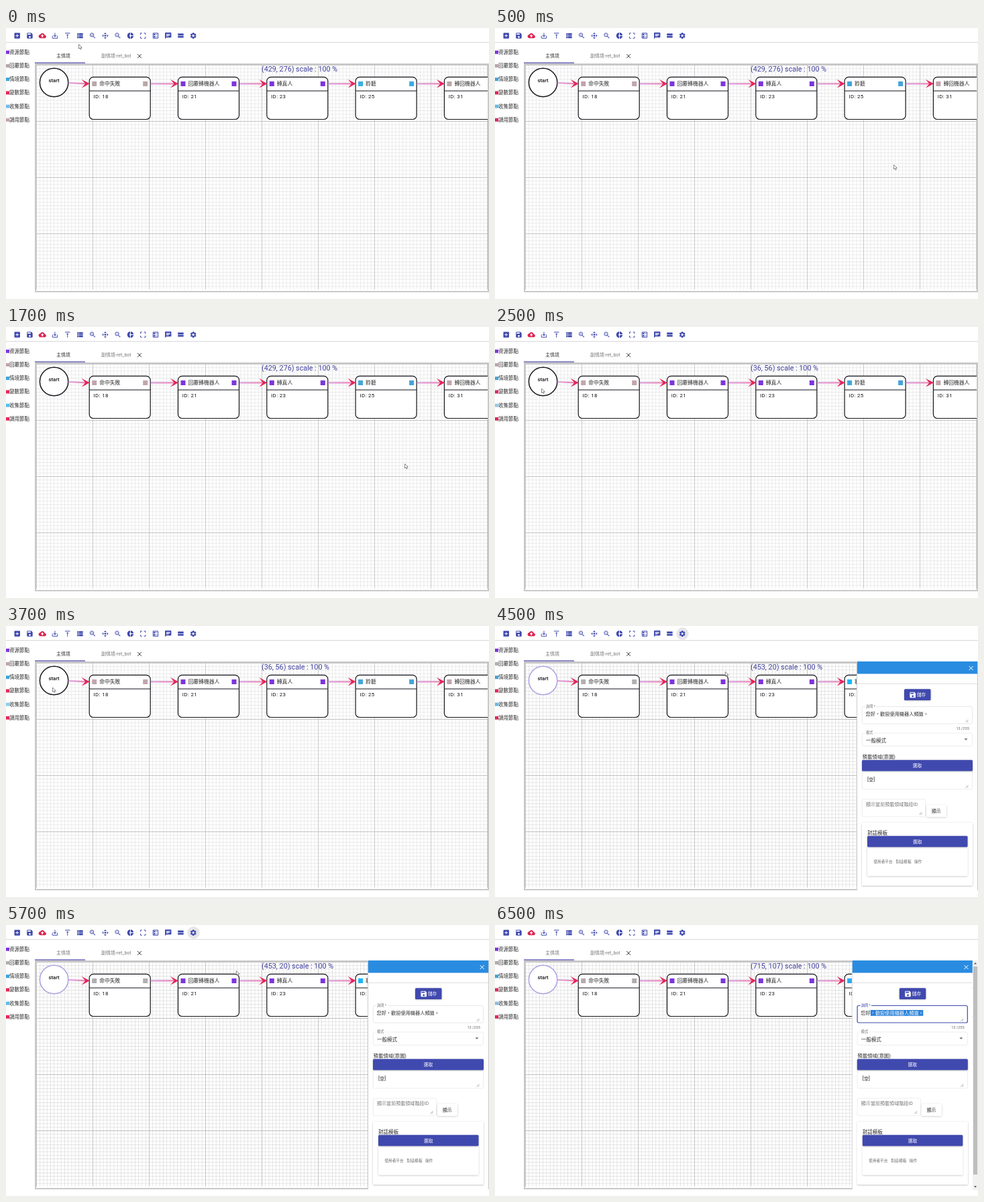
An HTML page for the animation above (8 s loop, 720 px wide and 405 px high).

```html
<!DOCTYPE html>
<html lang="zh-Hant">
<head>
<meta charset="utf-8">
<style>
html, body { margin: 0; width: 100%; height: 100%; overflow: hidden; background: #fff; }
svg { display: block; width: 720px; height: 405px; font-family: Roboto, "Noto Sans CJK TC", "Noto Sans CJK JP", "Noto Sans CJK", sans-serif; }
text { white-space: pre; }
</style>
</head>
<body>
<svg id="stage" viewBox="0 0 720 405"></svg>
<script>
const INDIGO = '#3f4aae', PURPLE = '#7c34dc', RED = '#e4265a';

const scenes = [
  { end: 500, coords: '429, 276', cursor: [108.5, 24.5], gray: '#b9a8a9', blue: '#38aee4', legend: ['#b3a9aa', '#79b9e6', '#c6a3a6'] },
  { end: 2500, coords: '429, 276', cursor: [594.5, 204.5], gray: '#c2a5ac', blue: '#43a5d9', legend: ['#c2a5ac', '#55c1ea', RED] },
  { end: 4500, coords: '36, 56', cursor: [69.5, 92], gray: '#c2a5ac', blue: '#43a5d9', legend: ['#c2a5ac', '#8fcdec', RED] },
  { end: 6500, coords: '453, 20', cursor: [343.3, 68.5], gray: '#b1afb0', blue: '#1cb5f6', legend: ['#b1afb0', '#62bce8', RED], panel: 547 },
  { end: 8000, coords: '715, 107', gray: '#b4abac', blue: '#2ba8ee', legend: ['#b4abac', '#84bfe8', RED], panel: 539.8, editing: true }
];

const box = 'M19 3H5c-1.1 0-2 .9-2 2v14c0 1.1.9 2 2 2h14c1.1 0 2-.9 2-2V5c0-1.1-.9-2-2-2z';
const lens = 'M15.5 14h-.79l-.28-.27C15.41 12.59 16 11.11 16 9.5 16 5.91 13.09 3 9.5 3S3 5.91 3 9.5 5.91 16 9.5 16c1.61 0 3.09-.59 4.23-1.57l.27.28v.79l5 4.99L20.49 19zm-6 0C7 14 5 12 5 9.5S7 5 9.5 5 14 7 14 9.5 12 14 9.5 14z';
const floppy = 'M17 3H5c-1.1 0-2 .9-2 2v14c0 1.1.9 2 2 2h14c1.1 0 2-.9 2-2V7zm-5 16a3 3 0 1 1 0-6 3 3 0 0 1 0 6zm3-10H5V5h10z';
const icons = [
  box + 'm-2 10h-4v4h-2v-4H7v-2h4V7h2v4h4z',
  floppy,
  'M19.35 10.04C18.67 6.59 15.64 4 12 4 9.11 4 6.6 5.64 5.35 8.04 2.34 8.36 0 10.91 0 14c0 3.31 2.69 6 6 6h13c2.76 0 5-2.24 5-5 0-2.64-2.05-4.78-4.65-4.96zM14 13v4h-4v-4H7l5-5 5 5z',
  'M19 12v7H5v-7H3v7c0 1.1.9 2 2 2h14c1.1 0 2-.9 2-2v-7zm-6 .67l2.59-2.58L17 11.5l-5 5-5-5 1.41-1.41L11 12.67V3h2z',
  'M8 11h3v10h2V11h3l-4-4zM4 3v2h16V3z',
  'M3 4h4v4.6H3zM8 4h13v4.6H8zM3 9.7h4v4.6H3zM8 9.7h13v4.6H8zM3 15.4h4V20H3zM8 15.4h13V20H8z',
  lens + 'M7 9h2V7h1v2h2v1h-2v2H9v-2H7z',
  'M12 2l4 4.5H8zM12 22l4-4.5H8zM2 12l4.5-4v8zM22 12l-4.5-4v8zM12 9a3 3 0 1 0 .01 0z',
  lens + 'M7 9h5v1H7z',
  'M11 9.16V2c-5 .5-9 4.79-9 10s4 9.5 9 10v-7.16c-1-.41-2-1.52-2-2.84s1-2.43 2-2.84zM14.86 11H22c-.48-4.75-4-8.53-9-9v7.16c1 .3 1.52.98 1.86 1.84zM13 14.84V22c5-.47 8.52-4.25 9-9h-7.14c-.34.86-.86 1.54-1.86 1.84z',
  'M3 5v4h2V5h4V3H5c-1.1 0-2 .9-2 2zm2 10H3v4c0 1.1.9 2 2 2h4v-2H5zm14 4h-4v2h4c1.1 0 2-.9 2-2v-4h-2zm0-16h-4v2h4v4h2V5c0-1.1-.9-2-2-2z',
  box + 'M19 19H5V5h14zM13 7.5h5v2h-5zM13 14.5h5v2h-5zM11 6H6v5h5zM11 13H6v5h5z',
  'M20 2H4c-1.1 0-2 .9-2 2v18l4-4h14c1.1 0 2-.9 2-2V4c0-1.1-.9-2-2-2zM6 9h12v2H6zM14 14H6v-2h8zM18 8H6V6h12z',
  'M3 18.5h18v-6H3zM3 5v6h18V5z',
  'M19.14 12.94a7 7 0 0 0 0-1.88l2.03-1.58c.18-.14.23-.41.12-.61l-1.92-3.32c-.12-.22-.37-.29-.59-.22l-2.39.96a7 7 0 0 0-1.62-.94l-.36-2.54A.48.48 0 0 0 13.93 2.4h-3.84c-.24 0-.43.17-.47.41l-.36 2.54a7 7 0 0 0-1.62.94l-2.39-.96c-.22-.08-.47 0-.59.22L2.74 8.87c-.12.21-.08.47.12.61l2.03 1.58a7 7 0 0 0 0 1.88l-2.03 1.58c-.18.14-.23.41-.12.61l1.92 3.32c.12.22.37.29.59.22l2.39-.96c.5.38 1.03.7 1.62.94l.36 2.54c.05.24.24.41.48.41h3.84c.24 0 .44-.17.47-.41l.36-2.54a7 7 0 0 0 1.62-.94l2.39.96c.22.08.47 0 .59-.22l1.92-3.32c.12-.22.07-.47-.12-.61zM12 15.6a3.6 3.6 0 1 1 0-7.2 3.6 3.6 0 0 1 0 7.2z'
];

const rect = (x, y, w, h, fill, more = '') => `<rect x="${x}" y="${y}" width="${w}" height="${h}" fill="${fill}" ${more}/>`;
const path = (d, stroke, width = 1, more = 'fill="none"') => `<path d="${d}" stroke="${stroke}" stroke-width="${width}" ${more}/>`;
const text = (x, y, size, str, fill = '#2c2c2c', more = '') => `<text x="${x}" y="${y}" font-size="${size}" fill="${fill}" ${more}>${str}</text>`;
const mid = 'text-anchor="middle"';
const icon = (x, y, d, fill, k = .47) => `<path transform="translate(${x} ${y}) scale(${k}) translate(-12 -12)" d="${d}" fill="${fill}" fill-rule="evenodd"/>`;
const cross = (x, y, r, color) => path(`M${x - r} ${y - r}l${2 * r} ${2 * r}m0 ${-2 * r}l${-2 * r} ${2 * r}`, color);
const grid = (id, step, color, width) => `<pattern id="${id}" x="45" y="55" width="${step}" height="${step}" patternUnits="userSpaceOnUse">${path(`M${step} 0H0V${step}`, color, width)}</pattern>`;

const defs = `<defs>
  ${grid('minor', 5.25, '#aaa', .9)}
  ${grid('major', 84, '#a0a0a0', 1.4)}
  <linearGradient id="link"><stop stop-color="#dba0e0"/><stop offset="1" stop-color="#ee86b6"/></linearGradient>
  <clipPath id="view"><path d="M45 55H718V393H45z"/></clipPath>
  <filter id="shade" x="-20%" y="-20%" width="140%" height="150%"><feDropShadow dx="0" dy=".7" stdDeviation=".8" flood-opacity=".28"/></filter>
</defs>`;

function toolbar(s) {
  let out = path('M0 21.5H720', '#d9d9de');
  if (s.panel && !s.editing) out += '<circle cx="279.5" cy="11.5" r="9.2" fill="#e6e6ea"/>';
  icons.forEach((d, i) => out += icon(16.7 + i * 18.75, 11.5, d, i == 2 ? '#dc2450' : INDIGO));
  return out;
}

function sidebar(s) {
  const colors = [PURPLE, s.legend[0], '#3ea3d8', RED, s.legend[1], s.legend[2]];
  return ['資源', '回覆', '情境', '變數', '收集', '調用'].map((name, i) => {
    const y = 36 + i * 20.2;
    return rect(0, y - 2.2, 5, 5, colors[i]) + text(5, y + 2.8, 7.5, name + '節點');
  }).join('');
}

function tabs(s) {
  return text(85.5, 44.2, 7, '主情境', s.panel ? '#777' : '#333', mid)
    + text(142, 44.2, 7, '副情境-ret_bot', '#777')
    + cross(199, 42, 3, '#444')
    + rect(43, 51.3, 75, 1.5, '#6c65b8');
}

function node(x, id, name, color) {
  return rect(x, 73.3, 91, 63.2, '#fff', 'rx="6" stroke="#15151c" stroke-width="1.2"')
    + path(`M${x} 94h91`, '#15151c', 1.2)
    + rect(x + 4, 79.8, 7, 7.2, color) + rect(x + 80, 79.8, 7, 7.2, color)
    + text(x + 15, 86.2, 7.8, name)
    + text(x + 6.3, 104.8, 7.8, 'ID: ' + id, '#111', 'letter-spacing=".4"');
}

function link(x1, x2) {
  const y = x1 < 100 ? 82 : 83.3;
  return path(`M${x1} ${y}L${x2 - 5} 83.4`, 'url(#link)', 2.2)
    + `<path d="M${x2 + .5} 83.3l-12-6.5 5.5 6.5-5.5 6.5z" fill="${RED}"/>`;
}

function board(s) {
  const xs = [0, 1, 2, 3, 4].map(i => 124.2 + i * 132.3);
  const nodes = [[18, '命中失敗', s.gray], [21, '回覆轉機器人', PURPLE], [23, '轉真人', PURPLE], [25, '聆聽', s.blue], [31, '轉回機器人', s.gray]];
  return rect(44, 54, 675, 340, '#fff', 'stroke="#c9c9c9" stroke-width="2"')
    + '<g clip-path="url(#view)">'
    + rect(45, 55, 673, 335.8, 'url(#minor)', `opacity="${s.panel ? .65 : .5}"`)
    + rect(45, 55, 673, 335.8, 'url(#major)', 'opacity=".65"')
    + `<circle cx="71.6" cy="81.5" r="21.2" fill="#fff" stroke="${s.panel ? '#aaa0e2' : '#15151c'}" stroke-width="1.5"/>`
    + text(71.6, 80.8, 7.6, 'start', '#111', mid + ' font-weight="500"')
    + xs.map((x, i) => node(x, ...nodes[i])).join('')
    + xs.map((x, i) => link(i ? xs[i - 1] + 91.6 : 93, x)).join('')
    + text(381, 65, 10.75, `(${s.coords}) scale : 100 %`, '#41419f')
    + '</g>';
}

// The form is drawn from its own left edge, shifted by s.panel.
function form(s) {
  const frame = (x, y, w, h) => rect(x, y, w, h, '#fff', 'rx="2" stroke="#ebebeb" stroke-width=".9"');
  const card = (x, y, w, h) => rect(x, y, w, h, '#fff', 'rx="1.5" filter="url(#shade)"');
  const button = (x, y, w, h, label, tx = x + w / 2) => rect(x, y, w, h, INDIGO, 'rx="1.5" filter="url(#shade)"') + text(tx, y + h / 2 + 2.5, 6.8, label, '#fff', mid);
  const grip = (x, y) => path(`M${x - 4} ${y}l4-4m-1.8 4l1.8-1.8`, '#888', .7);
  const accent = s.editing ? INDIGO : '#777';
  const message = '您好<tspan' + (s.editing ? ' fill="#fff"' : '') + '>，歡迎使用機器人頻道。</tspan>';
  return `<g transform="translate(${s.panel} 0)">`
    + rect(-8, 53, 1, 342, '#ccc') + rect(-7, 53, 179, 343, '#fff')
    + rect(-7, 53, 179, 18.5, '#2a8ce0') + cross(162.7, 63, 3, '#fff')
    + path('M-7 86.3H172', '#ddd')
    + button(63, 94.3, 39.5, 16.7, '儲存', 88.6) + icon(75.7, 103, floppy, '#fff', .48)
    + rect(.3, 120.5, 164.2, 25.5, '#fff', `rx="2" stroke="${s.editing ? INDIGO : '#e6e6e6'}" stroke-width="${s.editing ? 1.2 : .9}"`)
    + rect(4.8, 118, 16.5, 5, '#fff') + text(6, 121.7, 5.2, '詢問 *', accent)
    + (s.editing ? rect(20, 127, 78.5, 8.8, '#2a82d8') : '')
    + text(5.5, 133.8, 7.2, message) + grip(158.5, 143.8)
    + text(159.8, 155, 5.6, '13 /255', '#666', 'text-anchor="end"')
    + frame(.3, 160, 164.2, 19.5) + rect(4.8, 157.5, 13, 5, '#fff') + text(6, 161.2, 5.2, '模式', '#666')
    + text(6, 173.5, 7.5, '一般模式') + '<path d="M152.5 168.3h5l-2.5 2.5z" fill="#666"/>'
    + text(.5, 198, 7.4, '預載領域(意圖)')
    + frame(.3, 217, 164.2, 27) + button(0, 200.2, 165, 16.5, '選取')
    + text(8, 232, 7.3, '[空]') + grip(158.5, 241.8)
    + frame(.3, 259, 94.5, 26) + text(6, 268.7, 7.05, '顯示當前預載領域階段ID', '#777') + grip(89.5, 282)
    + card(96, 267.3, 30, 18) + text(110.8, 278.8, 6.8, '顯示', '#222', mid)
    + card(0, 294, 165, 94) + text(8, 311.5, 7.5, '對話模板')
    + card(8, 331, 149.5, 42.5) + button(8, 313.8, 149.5, 16.5, '選取')
    + text(17.5, 354, 5.6, '使用者平台', '#666') + text(50.5, 354, 5.8, '對話模板', '#666') + text(78, 354, 5.6, '操作', '#666')
    + '</g>';
}

const scrollbar = () => rect(712, 53, 8, 343, '#f1f1f1') + rect(713, 62, 6, 311, '#bdbdbd')
  + '<path d="M714 58.5h4l-2-2.5zM714 390h4l-2 2.5z" fill="#555"/>';

const pointer = ([x, y]) => path(`M${x} ${y}v6.5l1.5-1.3 1.1 2.3 1.2-.6-1-2.2h2z`, '#555', .7, 'fill="#fff"');

function draw(s) {
  return defs + toolbar(s) + sidebar(s) + tabs(s) + board(s)
    + (s.panel ? form(s) : '') + (s.editing ? scrollbar() : '')
    + (s.cursor ? pointer(s.cursor) : '');
}

const stage = document.getElementById('stage');
const start = performance.now();
let shown;
function tick() {
  const t = (performance.now() - start) % 8000;
  const scene = scenes.find(s => t < s.end);
  if (scene !== shown) stage.innerHTML = draw(shown = scene);
  requestAnimationFrame(tick);
}
tick();
</script>
</body>
</html>
```
